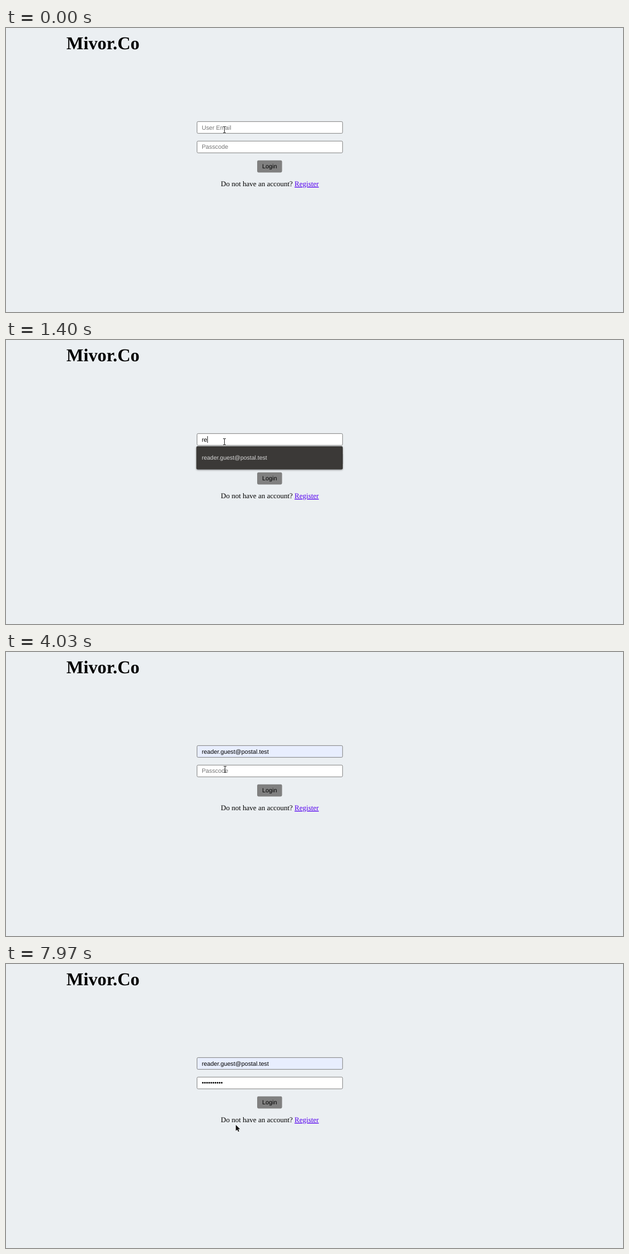
An HTML page that plays this animation: 1103 px wide and 508 px high, repeating every 8000 ms.

```html
<!DOCTYPE html>
<html lang="en">
<head>
<meta charset="utf-8">
<title>Login form</title>
<style>
  html, body { margin: 0; width: 100%; height: 100%; overflow: hidden; background: #ebeff2; }
  svg { display: block; width: 1103px; height: 508px; }
  text { text-rendering: geometricPrecision; white-space: pre; }
  .ui { font: 10.77px "Liberation Sans", Arial, sans-serif; }
  .item { font: 10.5px "Liberation Sans", Arial, sans-serif; fill: #d8d8d8; }
  .serif { font: 13px "Liberation Serif", "Times New Roman", serif; }
  .title { font: bold 32.3px "Liberation Serif", "Times New Roman", serif; }
  .field { fill: #fff; stroke: #767676; stroke-width: .9; }
  .link { fill: #5500ee; text-decoration: underline; }
  #popup { filter: drop-shadow(0 1px 1.5px rgba(0, 0, 0, .45)); }
</style>
</head>
<body>
<svg viewBox="0 0 1103 508">
  <rect width="1103" height="508" fill="#ebeff2"/>
  <text class="title" x="108" y="38">Mivor.Co</text>

  <rect id="emailBox" class="field" x="341.5" y="167.4" width="260.2" height="21" rx="2"/>
  <text id="email" class="ui" x="349.9" y="181.8"></text>
  <rect class="field" x="341.5" y="202.3" width="260.2" height="21" rx="2"/>
  <text id="pass" class="ui" x="349.9" y="216.4"></text>
  <rect id="caret" width=".9" height="12"/>

  <rect x="449" y="236.8" width="44.5" height="21.6" rx="2.4" fill="#808080"/>
  <text class="ui" x="458.1" y="251.4">Login</text>
  <text class="serif" x="384.1" y="283">Do not have an account? <tspan class="link">Register</tspan></text>

  <g id="popup">
    <rect id="panel" x="340.3" y="190" width="261.7" rx="2.4" fill="#3b3937"/>
    <rect id="hover" x="340.3" y="195.5" width="261.7" height="30.2" fill="#4a12d6"/>
    <g id="items"></g>
  </g>

  <g id="pointer">
    <g id="beam" fill="none" stroke-linecap="square">
      <path d="M-2-5.5H2M-2 5.5H2M0-5V5" stroke="#fff" stroke-opacity=".7" stroke-width="2"/>
      <path d="M-2-5.5H-.7M.7-5.5H2M-2 5.5H-.7M.7 5.5H2M0-5V5" stroke="#222" stroke-width="1"/>
    </g>
    <path id="arrow" d="M-.2-.3V10.4L2.4 8.2 4.1 12 5.9 11.2 4.2 7.5H7.5Z"
          fill="#111" stroke="#fff" stroke-width="1.2" stroke-linejoin="round" paint-order="stroke"/>
  </g>
</svg>
<script>
const LOOP = 8000;
const $ = id => document.getElementById(id);
const user = "reader.guest@postal.test";
const contacts = [
  "paperlantern@postal.test", "blue.kettles@postal.test", "p.lantern@schooldesk.test",
  "+000555010042", "r.notebook@postal.test", "e.paperplane@postal.test"
];
const matches = [
  "r.notebook@postal.test", user, "rustic.windowbox@postal.test",
  "river.pebble@postal.test", "red.umbrella@postal.test", "rain.barrel@postal.test"
];

// Each step holds until the next one and changes only the listed values.
const steps = [
  [0, { email: "", dots: 0, caret: "", list: [], hover: false, shape: "beam", at: [390.5, 182] }],
  [400, { caret: "email" }],
  [430, { list: contacts }],
  [1130, { email: user.slice(0, 1), list: matches }],
  [1400, { email: user.slice(0, 2), list: [user] }],
  [1530, { email: user.slice(0, 3) }],
  [2070, { caret: "", at: [392, 184] }],
  [2230, { email: user, hover: true, shape: "arrow", at: [397, 197] }],
  [2370, { at: [399, 202] }],
  [2530, { at: [399.6, 204.6] }],
  [2830, { list: [], hover: false, caret: "email" }],
  [3000, { shape: "beam", at: [399.6, 205] }],
  [3130, { at: [396, 208] }],
  [3300, { at: [391.6, 210] }],
  [3470, { caret: "pass" }],
  [4030, { caret: "" }],
  [4200, { dots: 1, caret: "pass" }],
  [4330, { dots: 2 }],
  [4500, { dots: 3 }],
  [4830, { dots: 5 }],
  [5130, { dots: 6 }],
  [5470, { dots: 7 }],
  [5630, { dots: 8 }],
  [5770, { dots: 9 }],
  [5930, { dots: 10 }],
  [6570, { caret: "" }],
  [7070, { caret: "pass" }],
  [7230, { at: [378, 213] }],
  [7370, { shape: "arrow", at: [420, 238] }],
  [7530, { at: [474, 263] }],
  [7670, { caret: "", at: [468, 290] }],
  [7830, { at: [440, 299] }],
  [7970, { at: [411, 288] }]
];

let state = {};
const timeline = steps.map(([time, change]) => [time, state = { ...state, ...change }]);

const show = (id, on) => $(id).setAttribute("visibility", on ? "visible" : "hidden");

function fill(id, value, placeholder) {
  $(id).textContent = value || placeholder;
  $(id).setAttribute("fill", value ? "#000" : "#757575");
}

function drawList({ list, hover }) {
  $("popup").style.display = list.length ? "" : "none";
  $("panel").setAttribute("height", 12.4 + 29.17 * list.length);
  show("hover", hover);
  $("items").replaceChildren(...list.map((label, i) => {
    const text = document.createElementNS("http://www.w3.org/2000/svg", "text");
    text.setAttribute("class", "item");
    text.setAttribute("x", 349.9);
    text.setAttribute("y", 214.2 + 29.17 * i);
    if (hover) text.style.fill = "#fff";
    text.textContent = label;
    return text;
  }));
}

function drawCaret({ caret, email, dots }) {
  show("caret", caret);
  if (!caret) return;
  const filled = caret === "email" ? email : dots;
  const width = filled ? $(caret).getComputedTextLength() : 0;
  $("caret").setAttribute("x", 350.2 + width);
  $("caret").setAttribute("y", caret === "email" ? 172 : 207);
}

function draw(s) {
  fill("email", s.email, "User Email");
  fill("pass", "•".repeat(s.dots), "Passcode");
  $("emailBox").style.fill = s.email === user ? "#e8eefe" : "#fff";
  drawList(s);
  drawCaret(s);
  show("beam", s.shape === "beam");
  show("arrow", s.shape === "arrow");
  $("pointer").setAttribute("transform", `translate(${s.at})`);
}

const start = performance.now();
let shown;
function tick() {
  const time = (performance.now() - start) % LOOP;
  const current = timeline.findLast(([from]) => from <= time)[1];
  if (current !== shown) draw(shown = current);
  requestAnimationFrame(tick);
}
tick();
</script>
</body>
</html>
```
